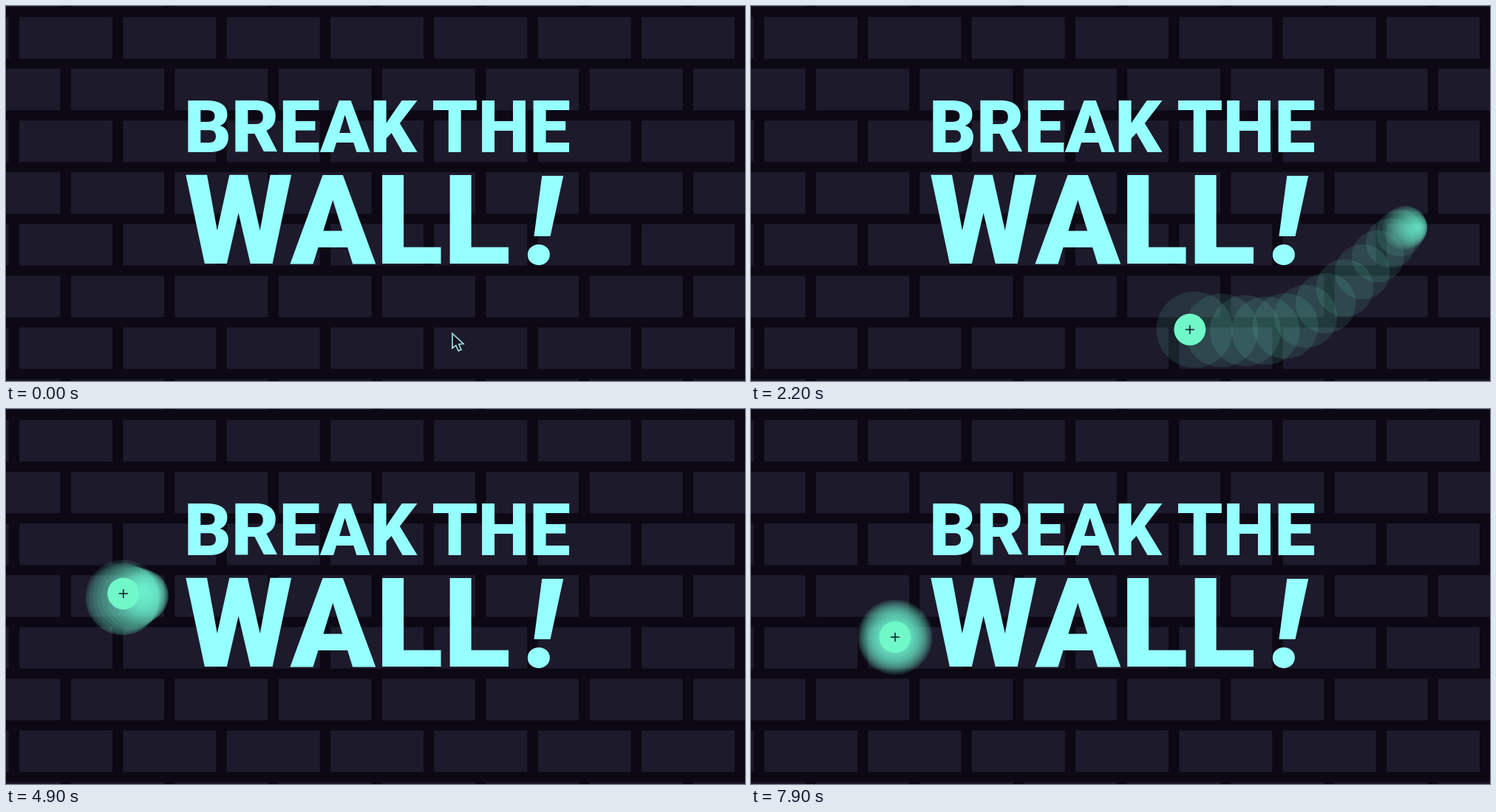
These frames come from a looping animation (1000x508 px, 8 s). An HTML page with a canvas:

```html
<!DOCTYPE html>
<html lang="en">
<head>
<meta charset="utf-8">
<title>Break the wall</title>
<style>
  html, body { margin: 0; width: 100%; height: 100%; overflow: hidden; background: #0c0814; }
  canvas { display: block; width: 1000px; height: 508px; }
</style>
</head>
<body>
<canvas id="stage" width="1000" height="508"></canvas>
<script>
const ctx = document.getElementById('stage').getContext('2d');
const LOOP = 8000, STEP = 100;
const TICK = 24, LIFE = 690, GLOW = 52, BALL = 21.5;
const START = 60;
const ARROW = new Path2D('M0 0v20l4.8-3.8 3.4 7.4 3.8-1.6-3.2-7.2 6.2-.6z');

// Turning points of the pointer: time, x, y
const path = [
  [START, 603, 457], [650, 317, 445],
  [1070, 317, 445], [1116, 390, 448], [1140, 578, 455], [1212, 790, 445],
  [1310, 842, 418], [1400, 888, 357], [1500, 902, 300],
  [1900, 886, 300], [2130, 690, 440], [2310, 427, 431], [2540, 184, 374],
  [2715, 161, 275], [2820, 176, 235],
  [4640, 187, 252], [4870, 158, 257], [5010, 172, 177], [5226, 311, 82],
  [5443, 657, 81], [5700, 770, 159], [5924, 792, 266], [6126, 741, 362],
  [6372, 435, 462], [6396, 335, 463], [6600, 162, 378],
  [6790, 310, 175], [6950, 690, 280], [7210, 195, 309]
];

function slope(i, axis) {
  const a = path[i], b = path[i + 1];
  return a && b ? (b[axis] - a[axis]) / (b[0] - a[0]) : 0;
}

// Harmonic mean keeps the curve from overshooting its points
function tangent(i, axis) {
  const p = slope(i - 1, axis), q = slope(i, axis);
  return p * q > 0 ? 2 * p * q / (p + q) : 0;
}

function pointerAt(t) {
  const last = path.length - 1;
  if (t >= path[last][0]) return path[last].slice(1);
  let i = 0;
  while (t >= path[i + 1][0]) i++;
  const [a, b] = [path[i], path[i + 1]];
  const span = b[0] - a[0];
  const u = (t - a[0]) / span, v = 1 - u;
  return [1, 2].map(axis =>
    v * v * (1 + 2 * u) * a[axis] + u * u * (3 - 2 * u) * b[axis] +
    span * u * v * (v * tangent(i, axis) - u * tangent(i + 1, axis)));
}

function disc(x, y, r) {
  ctx.beginPath();
  ctx.arc(x, y, r, 0, Math.PI * 2);
  ctx.fill();
}

function drawWall() {
  ctx.fillStyle = '#0c0814';
  ctx.fillRect(0, 0, 1000, 508);
  ctx.fillStyle = '#1d1a2b';
  for (let row = -1; row < 8; row++) {
    const shift = row % 2 ? -52.3 : -122.3;
    for (let col = 0; col < 9; col++) {
      ctx.fillRect(shift + col * 140.33, 15 + row * 70.07, 126, 56.3);
    }
  }
}

function write(text, font, x, y) {
  ctx.font = font;
  ctx.fillText(text, x + ctx.measureText(text).actualBoundingBoxLeft, y);
}

function drawTitle() {
  ctx.fillStyle = '#96ffff';
  ctx.wordSpacing = '-4px';
  write('BREAK THE', '900 99px Roboto, sans-serif', 246, 197.5);
  write('WALL', '900 169px Roboto, sans-serif', 242.5, 348.5);
  write('!', 'italic 900 169px Roboto, sans-serif', 705, 348.5);
}

function drawArrow() {
  ctx.save();
  ctx.translate(604, 443.5);
  ctx.fillStyle = '#14121f';
  ctx.fill(ARROW);
  ctx.strokeStyle = '#a5e6df';
  ctx.lineWidth = 1.6;
  ctx.stroke(ARROW);
  ctx.restore();
}

// Each tick leaves a disc behind that shrinks to nothing
function drawTrail(t) {
  ctx.fillStyle = 'rgba(112, 244, 205, 0.11)';
  const oldest = Math.max(START, t - LIFE);
  for (let born = (Math.ceil(oldest / TICK) + 0.5) * TICK; born <= t; born += TICK) {
    const [x, y] = pointerAt(born);
    disc(x, y, GLOW * (1 - (t - born) / LIFE));
  }
}

function drawBall(t) {
  const [x, y] = pointerAt(t);
  ctx.fillStyle = '#70f8c8';
  disc(x, y, BALL);
  ctx.fillStyle = '#14262c';
  ctx.fillRect(x - 6, y - 0.8, 12, 1.6);
  ctx.fillRect(x - 0.8, y - 6, 1.6, 12);
}

function frame(now) {
  const t = Math.floor((now % LOOP) / STEP) * STEP;
  drawWall();
  drawTitle();
  if (t < START) {
    drawArrow();
  } else {
    drawTrail(t);
    drawBall(t);
  }
  requestAnimationFrame(frame);
}
requestAnimationFrame(frame);
</script>
</body>
</html>
```
